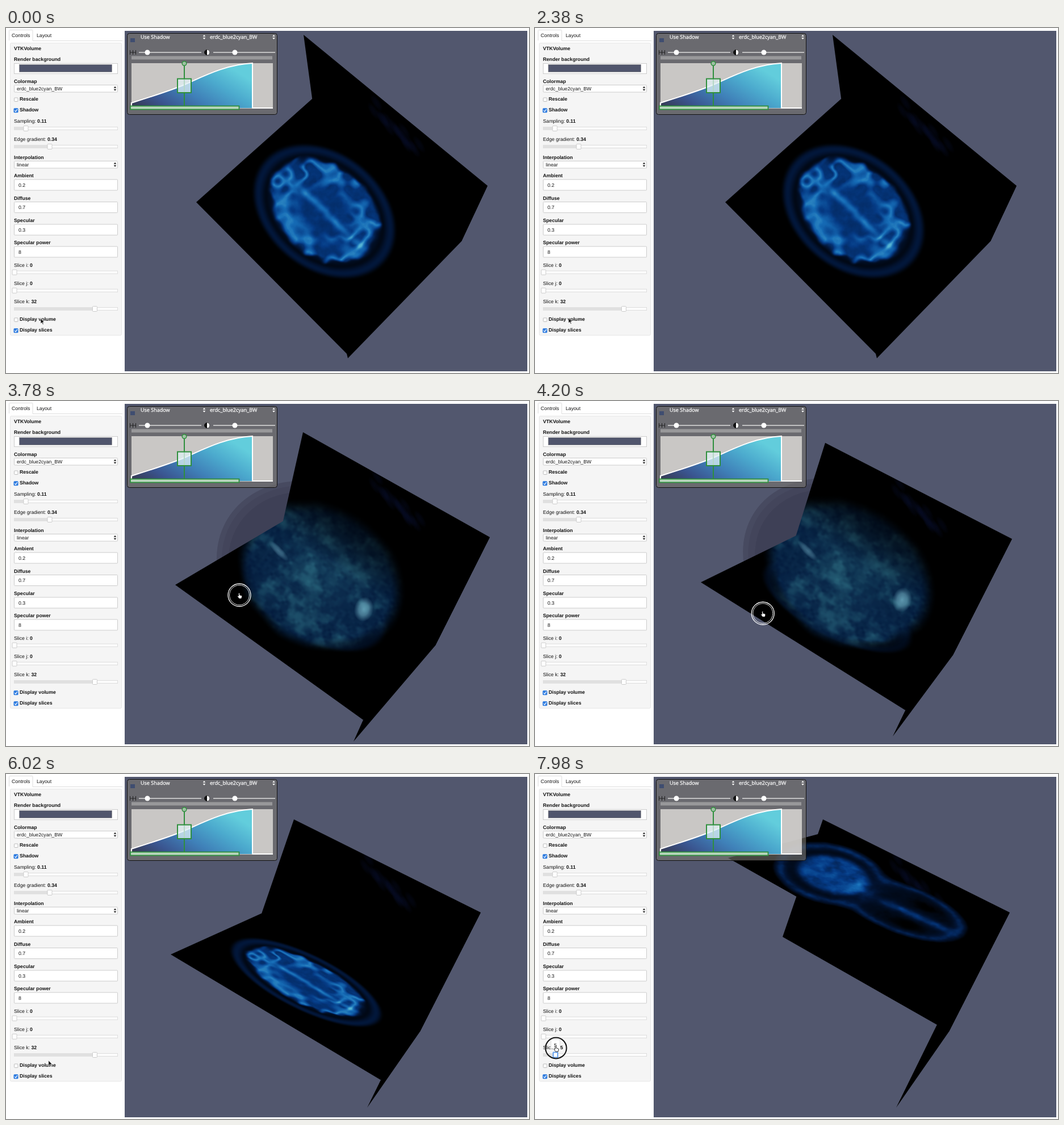
Animation, 921 px wide and 608 px high, one loop 8000 ms. Source, as an HTML page with a canvas:

```html
<!DOCTYPE html>
<html lang="en">
<head>
<meta charset="utf-8">
<title>Volume viewer</title>
<style>
  html, body { margin: 0; width: 100%; height: 100%; overflow: hidden; background: #fff; }
  canvas, svg { position: absolute; left: 0; top: 0; width: 921px; height: 608px; }
  text { font: 8.7px "Liberation Sans", Arial, sans-serif; fill: #111; text-rendering: geometricPrecision; white-space: pre; }
  .b { font-weight: bold; }
  .w { font: 9px "Open Sans", "Noto Sans", sans-serif; fill: #fff; stroke: #fff; stroke-width: .25px; }
</style>
</head>
<body>
<canvas id="view" width="921" height="608"></canvas>
<svg id="ui" viewBox="0 0 921 608"></svg>
<script>
const LOOP = 8000, STEP = 140;
const clamp = x => Math.max(0, Math.min(1, x));
const mix = (a, b, f) => a + (b - a) * f;
const mixPoint = (p, q, f) => [mix(p[0], q[0], f), mix(p[1], q[1], f)];
const smooth = (a, b, x) => { const f = clamp((x - a) / (b - a)); return f * f * (3 - 2 * f); };
const bell = (x, width) => Math.exp(-(x * x) / (width * width));

/* ---------- control panel ---------- */
const rect = (x, y, w, h, fill = '#fff', stroke = '#ccc', extra = '') =>
  `<rect x="${x}" y="${y}" width="${w}" height="${h}" fill="${fill}" stroke="${stroke}" ${extra}/>`;
const text = (x, y, s, cls = '') => `<text x="${x}" y="${y}" class="${cls}">${s}</text>`;
const arrows = (x, y, fill) =>
  `<path d="M${x - 2.3} ${y - 1}l2.3 -3l2.3 3zM${x - 2.3} ${y + 1}l2.3 3l2.3 -3z" fill="${fill}"/>`;
const heading = (y, s) => text(14, y + 3, s, 'b');

const select = (y, label, value) => heading(y, label) +
  rect(14.5, y + 6.5, 182, 12.5, '#fff', '#ccc', 'rx="1"') + text(19, y + 15.7, value) + arrows(192, y + 12.7, '#222');
const input = (y, label, value) => heading(y, label) +
  rect(14.5, y + 7, 182, 19, '#fff', '#ccc', 'rx="1"') + text(22, y + 19.7, value);
const slider = (y, label, value, x, id = '') =>
  `<text x="14" y="${y + 3}">${label}: <tspan class="b" id="${id}Value">${value}</tspan></text>` +
  rect(14.5, y + 10.5, 182, 5, '#fcfcfc', '#ddd') +
  `<rect id="${id}Fill" x="14" y="${y + 10}" width="${x - 14}" height="6" fill="#e0e0e0"/>` +
  `<rect id="${id}Knob" x="-4" y="${y + 8.5}" width="8" height="9" rx="1" fill="#fff" stroke="#ccc" transform="translate(${x})"/>`;
const tick = (y, id = '') => `<g id="${id}"><rect x="13.5" y="${y - 2.8}" width="8" height="8" rx="1.5" fill="#2f7de1"/>
  <path d="M15.3 ${y + 1.4}l1.7 1.9l3 -4.2" fill="none" stroke="#fff" stroke-width="1.2"/></g>`;
const checkbox = (y, label, mark) => rect(14.5, y - 2, 6.5, 6.5, '#fff', '#bbb', 'rx="1"') + mark + text(24, y + 3, label, 'b');

const panel =
  '<path d="M5.500 22V4.500Q5.500 3.500 6.500 3.500H46Q47 3.500 47 4.500V22.500" fill="#fff" stroke="#ddd"/>' +
  '<path d="M47 22.500H205" stroke="#ddd"/>' + text(10, 16, 'Controls') + text(54, 16, 'Layout') +
  rect(7.5, 26.5, 196, 515, '#f5f5f5', '#e6e6e6', 'rx="2"') +
  heading(35.5, 'VTKVolume') + heading(55, 'Render background') +
  rect(14.5, 62.5, 182, 18) + rect(23.5, 64.5, 163, 13, '#50556c', '#888', 'stroke-width=".6"') +
  select(94, 'Colormap', 'erdc_blue2cyan_BW') +
  checkbox(125, 'Rescale', '') + checkbox(144, 'Shadow', tick(144)) +
  slider(164, 'Sampling', '0.11', 35) + slider(196, 'Edge gradient', '0.34', 77) +
  select(228, 'Interpolation', 'linear') +
  input(260, 'Ambient', '0.2') + input(299.5, 'Diffuse', '0.7') +
  input(339, 'Specular', '0.3') + input(378, 'Specular power', '8') +
  slider(417.5, 'Slice i', 0, 15) + slider(449.7, 'Slice j', 0, 15) + slider(482, 'Slice k', 32, 156, 'k') +
  checkbox(513, 'Display volume', tick(513, 'volumeTick')) + checkbox(532, 'Display slices', tick(532));

/* ---------- transfer function widget ---------- */
const GREEN = '#2f8f3d';
const CURVE = 'M221 141V132C262 119 288 111 314 100S385 64 434 62V141';
const track = (x1, x2, knob) => `<path d="M${x1} 43H${x2}" stroke="#ddd" stroke-width="1.5"/><circle cx="${knob}" cy="43" r="4.5" fill="#fff"/>`;
const widget = `
  <defs><linearGradient id="map" x1="0" y1="1" x2="1" y2=".4"><stop stop-color="#36364a"/><stop offset=".25" stop-color="#3a5590"/>
    <stop offset=".5" stop-color="#3f80b8"/><stop offset=".75" stop-color="#4ba9cd"/><stop offset="1" stop-color="#62cddc"/></linearGradient></defs>` +
  rect(213.5, 9.5, 264, 143, 'rgba(122,119,113,.6)', '#111', 'rx="4"') +
  rect(219, 18, 8, 7, '#3f4d70', 'none') +
  text(237, 19, 'Use Shadow', 'w') + text(359, 19, 'erdc_blue2cyan_BW', 'w') +
  arrows(349, 16, '#fff') + arrows(471.5, 16, '#fff') +
  '<path d="M218.500 39V47M223.500 39V47M228.500 39V47M218 43H229" stroke="#222"/>' +
  track(234, 344, 249) + track(365, 474, 403) +
  '<circle cx="354" cy="43" r="4.500" fill="#111" stroke="#111"/><path d="M354 38.500a4.500 4.500 0 0 1 0 9z" fill="#fff"/>' +
  rect(221, 49.5, 248, 6, '#98989a', 'none') +
  rect(221, 62, 249, 80, 'rgba(214,212,210,.88)', 'none') +
  `<path d="${CURVE}z" fill="url(#map)"/>
   <path d="${CURVE}H470" fill="none" stroke="#fff" stroke-width="2"/>
   <path d="M314 66V137" stroke="${GREEN}" stroke-width="2"/>
   <circle cx="314" cy="62.500" r="3.800" fill="#9fc0a4" stroke="${GREEN}" stroke-width="1.500"/>` +
  rect(302, 89.5, 24, 24.5, 'rgba(225,240,245,.75)', GREEN, 'stroke-width="2"') +
  rect(219, 137.5, 191.5, 6, '#b9d6bd', GREEN, 'stroke-width="1.8"');

const pointer = `
  <g id="tip"><rect x="-8" y="468" width="16" height="16" fill="#fff" stroke="#ddd"/><text id="tipText" y="480.500" text-anchor="middle"></text></g>
  <g id="cursor">
    <g id="whiteRing" fill="none" stroke="#fff"><circle r="20" stroke-width="1.300"/><circle r="17.500" stroke-width=".9"/></g>
    <circle id="blackRing" r="18.500" fill="none" stroke="#111" stroke-width="2"/>
    <path id="arrow" d="M0 0V9L2.200 7.200L3.800 10.600L5.300 9.900L3.700 6.700H6.500z" fill="#111" stroke="#fff" stroke-width=".7"/>
    <path id="hand" d="M-1.500 -3q1.300 -1.500 2 .5v2.500l3 .8q1.500 .5 1 2.500l-1 3h-4l-3 -4q0 -1.500 2 -.5z" fill="#fff" stroke="#111" stroke-width=".9"/>
  </g>`;
document.getElementById('ui').innerHTML = panel + widget + pointer;
const $ = id => document.getElementById(id);
const show = (id, on) => $(id).setAttribute('visibility', on ? 'visible' : 'hidden');

/* ---------- procedural textures ---------- */
const hash = (x, y) => { const s = Math.sin(x * 127.1 + y * 311.7) * 43758.5453; return s - Math.floor(s); };
function noise(x, y) {
  const i = Math.floor(x), j = Math.floor(y), f = smooth(0, 1, x - i), g = smooth(0, 1, y - j);
  return mix(mix(hash(i, j), hash(i + 1, j), f), mix(hash(i, j + 1), hash(i + 1, j + 1), f), g);
}
const fractal = (x, y) => (noise(x, y) * 4 + noise(x * 2 + 9, y * 2) * 2 + noise(x * 4, y * 4 + 5)) / 7;

const RAMP = [[0, 0, 0], [2, 20, 52], [5, 58, 132], [22, 108, 182], [85, 180, 212]];
function ramp(level) {
  const s = clamp(level) * 3.999, i = Math.floor(s);
  return RAMP[i].map((c, n) => mix(c, RAMP[i + 1][n], s - i));
}

// Textures span -1.3..1.3 in both directions.
function texture(shade) {
  const size = 320, c = document.createElement('canvas'), g = c.getContext('2d');
  c.width = c.height = size;
  const image = g.createImageData(size, size);
  for (let n = 0; n < size * size; n++) {
    const x = (n % size / size - .5) * 2.6, y = (Math.floor(n / size) / size - .5) * 2.6;
    image.data.set(shade(x, y), n * 4);
  }
  g.putImageData(image, 0, 0);
  return c;
}

const brain = texture((x, y) => {
  const px = x * 142, py = y * 106, r = Math.hypot(x, y);
  const edge = r + .1 * (noise(px / 17, py / 17) - .5);
  const skull = (.17 + .1 * bell(r - .9, .06)) * smooth(1.02, .92, r) * (1 - .4 * bell(r - .8, .04));
  const folds = clamp(1.15 - 4 * Math.abs(noise(px / 19 + 30, py / 19 + 7) - .5));
  const middle = bell(y + .03 * (noise(px / 12, 8) - .5), .06) * smooth(-.5, -.35, x) * smooth(.75, .6, x) * (.5 + .6 * noise(px / 14, 3));
  const tissue = .44 + .1 * (fractal(px / 9, py / 9) - .5) + .36 * folds * smooth(.25, .55, r) + .36 * middle;
  return [...ramp(mix(skull, tissue, smooth(.79, .69, edge))), 255 * smooth(1.04, .95, r)];
});

const skullBase = texture((x, y) => {
  const oval = (cx, cy, rx, ry) => Math.hypot((x - cx) / rx, (y - cy) / ry);
  const back = oval(-.46, .05, .54, .84), front = oval(.36, 0, .66, .66);
  const outer = -Math.log(Math.exp(-7 * back) + Math.exp(-7 * front)) / 7;
  const lobe = smooth(1.15, .75, oval(-.42, .06, .34, .5));
  const grain = fractal(x * 12 + 20, y * 8);
  const outline = .24 * bell(outer - .85, .1) + .13 * smooth(1, .8, outer);
  const bridge = .24 * bell(x + .08, .14) * bell(y, .24) + .32 * bell(y + .02, .09) * smooth(0, .25, x) * smooth(1, .7, x);
  const hollow = bell(oval(.5, .3, .16, .14), .9) + bell(oval(.5, -.3, .16, .14), .9);
  const level = (outline + .4 * lobe + bridge) * (.65 + .6 * grain) * (1 - .8 * clamp(hollow));
  return [...ramp(level), 255 * smooth(.02, .12, level)];
});

const volume = texture((x, y) => {
  const px = x * 138, py = y * 125, r = Math.hypot(x, y) + .06 * (noise(px / 40, py / 40 + 3) - .5);
  const spots = smooth(.35, .9, fractal(px / 20 + 4, py / 20 + 11));
  const t = .5 * spots + .22 * bell(r, .5) + .15 * (noise(px / 5, py / 5) - .5);
  return [[5, 45], [33, 88], [68, 72]].map(([base, gain]) => base + gain * t)
    .concat(245 * smooth(1.03, .82, r) * mix(1, .4, smooth(.1, .9, y)));
});

/* ---------- camera poses ---------- */
const POSES = [
  { at: 3080, P: [524, 12], Q: [848, 278], R: [802, 376], S: [543, 153], T: [602, 582], N: [592, 542], A: [335, 307],
    slice: [560, 323], su: [102, 98], sv: [78, -71], body: [551, 302], bu: [100, 108], bv: [90, -82], spot: [597, 410] },
  { at: 3780, P: [523, 55], Q: [852, 240], R: [756, 431], S: [479, 251], T: [612, 600], N: [697, 410], A: [298, 324],
    slice: [542, 345], su: [113, 86], sv: [65, -49], body: [553, 308], bu: [128, 86], bv: [72, -104], spot: [630, 367] },
  { at: 4340, P: [507, 80], Q: [836, 244], R: [729, 454], S: [436, 287], T: [636, 588], N: [756, 344], A: [290, 318],
    slice: [528, 367], su: [125, 75], sv: [54, -28], body: [552, 303], bu: [138, 84], bv: [62, -107], spot: [652, 345] }
];
function poseAt(t) {
  const i = t < POSES[1].at ? 0 : 1, from = POSES[i], to = POSES[i + 1];
  const f = clamp((t - from.at) / (to.at - from.at)), pose = {};
  for (const key in from) if (key !== 'at') pose[key] = mixPoint(from[key], to[key], f);
  return pose;
}

/* ---------- viewport ---------- */
const ctx = $('view').getContext('2d');
function polygon(...points) {
  ctx.beginPath();
  points.forEach(p => ctx.lineTo(...p));
  ctx.fill();
}
function stamp(image, center, u, v, alpha = 1) {
  ctx.save();
  ctx.globalAlpha = alpha;
  ctx.transform(...u, ...v, ...center);
  ctx.drawImage(image, -1.3, -1.3, 2.6, 2.6);
  ctx.restore();
}
function glow(x, y, rx, ry, angle, r, g, b, alpha) {
  ctx.save();
  ctx.translate(x, y); ctx.rotate(angle); ctx.scale(rx, ry);
  const fill = ctx.createRadialGradient(0, 0, 0, 0, 0, 1);
  [1, .7, 0].forEach((f, i) => fill.addColorStop(i / 2, `rgba(${r},${g},${b},${alpha * f})`));
  ctx.fillStyle = fill;
  ctx.fillRect(-1, -1, 2, 2);
  ctx.restore();
}
function drawHalo(p) {
  ctx.save();
  ctx.beginPath(); ctx.rect(209, 5, 709, p.A[1] - 30); ctx.clip();
  ctx.transform(...p.bu, ...p.bv, ...p.body);
  for (const [r, alpha] of [[1.24, .2], [1.18, .08], [1.1, .1]]) {
    ctx.fillStyle = `rgba(24,18,38,${alpha})`;
    ctx.beginPath(); ctx.arc(0, 0, r, 0, 7); ctx.fill();
  }
  ctx.restore();
}
function drawView(t, k, volumeOn) {
  const p = poseAt(t), depth = k / 40, moved = 32 - k;
  const A = [p.A[0] + 1.85 * moved, p.A[1] - 6.3 * moved];
  const C = mixPoint(p.P, p.S, depth), D = mixPoint(p.Q, p.R, depth), B = mixPoint(p.N, p.T, depth);
  ctx.clearRect(0, 0, 921, 608);
  ctx.fillStyle = '#000';
  polygon(p.P, p.Q, p.R, p.S);
  polygon(p.Q, p.R, p.T, p.N);
  polygon(A, C, D, B);

  // Tissue stays within the slices; halo and background go behind them.
  ctx.globalCompositeOperation = 'source-atop';
  const [mx, my] = mixPoint(p.P, p.Q, .5);
  for (let i = 0; i < 16; i++)
    glow(mx - 45 + i * 5 + 14 * hash(i, 1), my - 15 + i * 5 + 24 * hash(i, 2), 18, 7, 1, 8, 16, 52, .3);

  const center = [p.slice[0] + 2.3 * moved, p.slice[1] - 5.73 * moved], low = clamp((31 - k) / 26);
  const u = mixPoint(p.su, [165, 75], low), v = mixPoint(p.sv, [60, -50], low);
  stamp(brain, center, u, v, (1 - low) * (volumeOn ? .45 : 1));
  stamp(skullBase, center, u, v, low);
  if (volumeOn) {
    stamp(volume, p.body, p.bu, p.bv);
    glow(...p.spot, 17, 22, .2, 115, 180, 200, .8);
    const turned = clamp((t - 3080) / 700);
    glow(480, 264, 24, 7, .8, 95, 150, 175, .6 * turned);
  }

  ctx.globalCompositeOperation = 'destination-over';
  if (volumeOn) drawHalo(p);
  ctx.fillStyle = '#52576e';
  ctx.fillRect(209, 5, 709, 600);
  ctx.globalCompositeOperation = 'source-over';
}

/* ---------- timeline ---------- */
const TOGGLES = [280, 1960, 2660, 5600];
const PATH = [[0, 61, 512], [1540, 59, 511], [2660, 59, 511], [3080, 430, 250], [3780, 411, 342], [4340, 398, 385],
  [4900, 155, 436], [5460, 20, 512], [5740, 20, 512], [6440, 157, 494], [7140, 157, 494], [7280, 144, 493], [7980, 37, 483]];
function cursorAt(t) {
  const i = Math.max(1, PATH.findIndex(key => key[0] >= t)), from = PATH[i - 1], to = PATH[i];
  return mixPoint(from.slice(1), to.slice(1), (t - from[0]) / (to[0] - from[0]));
}

function render(t) {
  const volumeOn = TOGGLES.filter(at => at <= t).length % 2 === 1;
  const orbiting = t >= 3080 && t <= 4340, sliding = t >= 7140;
  const k = t < 7280 ? 32 : Math.round(mix(31, 5, (t - 7280) / 700));
  drawView(t, k, volumeOn);

  const knob = 13.7 + 4.46 * k;
  $('kValue').textContent = $('tipText').textContent = k;
  $('kFill').setAttribute('width', knob - 14);
  $('kKnob').setAttribute('transform', `translate(${knob})`);
  $('kKnob').setAttribute('stroke', sliding ? '#6aa3ee' : '#ccc');
  $('kKnob').setAttribute('stroke-width', sliding ? 2 : 1);
  $('tip').setAttribute('transform', `translate(${knob})`);
  $('cursor').setAttribute('transform', `translate(${cursorAt(t)})`);

  const hand = orbiting || t >= 6440;
  show('volumeTick', volumeOn);
  show('tip', sliding);
  show('whiteRing', orbiting);
  show('blackRing', sliding || TOGGLES.includes(t + STEP));
  show('hand', hand);
  show('arrow', !hand);
}

let shown = -1;
function tickFrame() {
  const t = Math.floor(performance.now() % LOOP / STEP) * STEP;
  if (t !== shown) render(shown = t);
  requestAnimationFrame(tickFrame);
}
tickFrame();
</script>
</body>
</html>
```
